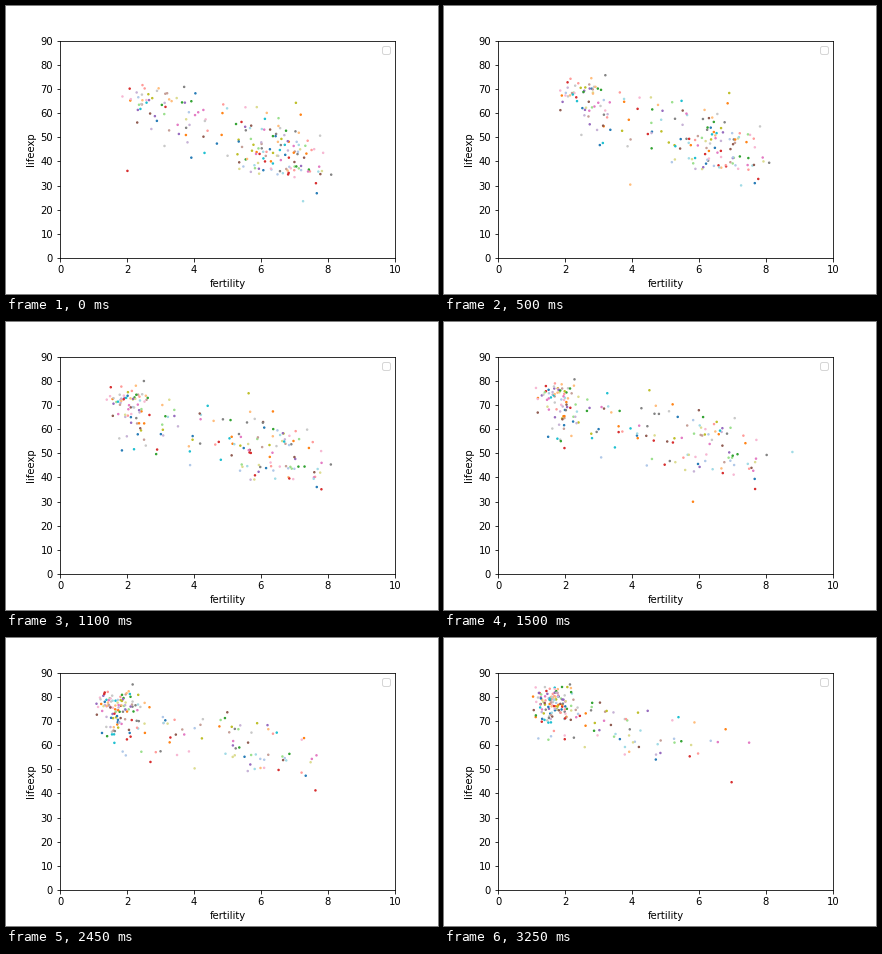
These frames come from a looping animation (432 px wide and 288 px high, 3300 ms). A matplotlib script:

```python
import numpy as np
import matplotlib.pyplot as plt
from matplotlib.animation import FuncAnimation

YEARS = 66
COUNTRIES = 178
t = np.arange(YEARS)
rng = np.random.default_rng(4)


def sigmoid(z):
    return 1 / (1 + np.exp(-z))


def noise():
    """One bounded random trait per country, as a column."""
    return np.clip(rng.normal(size=(COUNTRIES, 1)), -1.9, 1.9)


def wobble(size):
    """Slow individual swings around the main trend."""
    phase = rng.uniform(0, 2 * np.pi, (COUNTRIES, 1))
    period = rng.uniform(18, 40, (COUNTRIES, 1))
    return size * np.sin(2 * np.pi * t / period + phase)


def transition():
    """Families shrink and lives lengthen, later in countries of higher rank."""
    rank = rng.permutation((np.arange(COUNTRIES) + .5) / COUNTRIES)[:, None]

    # fertility falls from a high to a low level; the low one includes a baby boom
    top = 6.6 + .65 * noise()
    bottom = 1.65 + .27 * noise() + .8 * sigmoid((20 - t) / 5)
    middle = 120 * rank - 39 + 5 * noise()
    fertility = bottom + (top - bottom) * sigmoid((middle - t) / 9) + wobble(.1)

    # life expectancy climbs towards a ceiling
    ceiling = 83 + 2.6 * noise()
    middle = -30 + 100 * rank - 22 * rank ** 2 + (8 + 14 * rank) * noise()
    pace = 35 - 36 * rank * (1 - rank)
    life = 28 + (ceiling - 28) * sigmoid((t - middle) / pace) + wobble(.9)
    return np.stack([fertility, life], axis=-1)


def outlier(start, end, fall, peak=0, width=1, shock=(0, 0)):
    """Steady change, fertility dropping around year `fall`, plus a shock."""
    bump = np.exp(-((t - peak) / width) ** 2)
    fertility = start[0] + (end[0] - start[0]) * sigmoid((t - fall) / 4)
    life = np.linspace(start[1], end[1], YEARS)
    return np.stack([fertility + shock[0] * bump, life + shock[1] * bump], axis=-1)


# wars, famines and extreme families, each with its tab20 colour
outliers = {
    0: outlier((7.67, 26.8), (4.2, 54), 58),
    2: outlier((6.3, 40), (2.6, 68), 43, 28, 3.2, (-.5, -34)),
    3: outlier((5.6, 41), (1.6, 76), 23, 10, 2, (-1.5, -16)),
    6: outlier((1.95, 35.8), (2, 71), 33, 14, 7, (3.5, 14)),
    12: outlier((7.4, 36), (7.5, 61), 33, 27, 15, (.2, -5)),
    13: outlier((6.3, 37), (2.95, 64), 45, 60, .5, (0, -29.5)),
    14: outlier((8.1, 34.5), (3.9, 66.5), 46, 44, 1, (0, -42)),
    19: outlier((7.26, 23.5), (4.2, 66), 49, 34, 9, (1.9, 9)),
}

tracks = np.concatenate([transition(), list(outliers.values())])
codes = [i % 20 for i in range(COUNTRIES)] + list(outliers)

fig, ax = plt.subplots(figsize=(6, 4), dpi=72)
fig.subplots_adjust(left=.125, right=.9, bottom=.125, top=.88)
dots = ax.scatter(*tracks[:, 0].T, s=1, c=plt.get_cmap("tab20")(codes), linewidths=1.5)
ax.set(xlim=(0, 10), ylim=(0, 90), xlabel="fertility", ylabel="lifeexp")
ax.legend(handles=[], loc="upper right")


def update(year):
    dots.set_offsets(tracks[:, year])
    return dots,


anim = FuncAnimation(fig, update, frames=YEARS, interval=50, repeat=True, repeat_delay=0)
plt.show()
```
